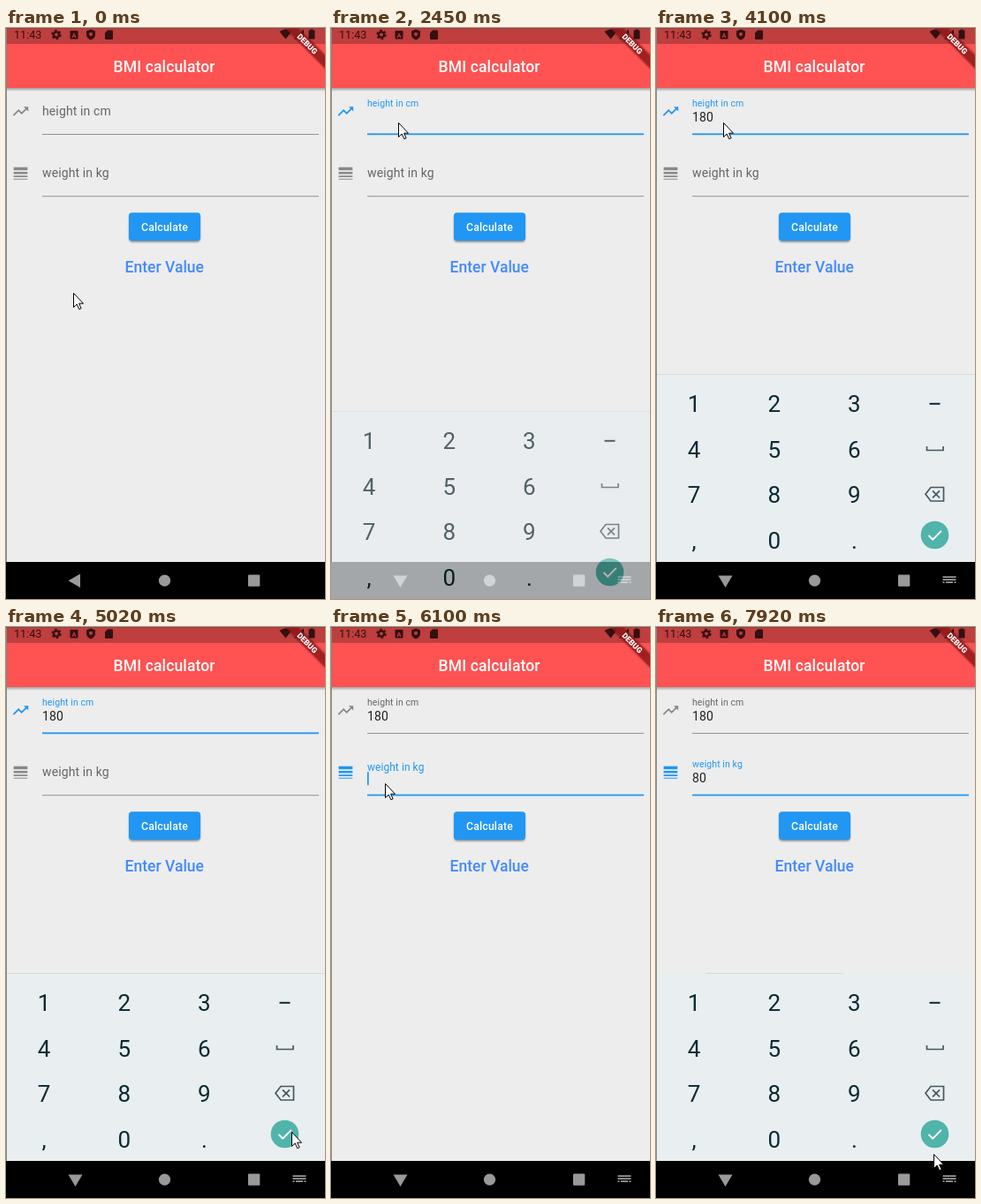
An HTML page that plays this animation: 361x647 px, repeating every 8 s.

```html
<!DOCTYPE html>
<html lang="en">
<head>
<meta charset="utf-8">
<title>BMI calculator</title>
<style>
  html, body { margin: 0; width: 100%; height: 100%; overflow: hidden; background: #ededed; }
  svg { display: block; width: 361px; height: 647px; font-family: Roboto, sans-serif; }
  .field { font-size: 14px; letter-spacing: .12px; }
  .title { font-size: 17.5px; font-weight: 500; }
  .keys text { font-size: 26px; text-anchor: middle; fill: #0b2a32; }
  .stroke { fill: none; stroke: #46585f; stroke-width: 1.7; }
</style>
</head>
<body>
<svg viewBox="0 0 361 647">
  <defs>
    <filter id="soft" x="-20%" y="-50%" width="140%" height="200%"><feGaussianBlur stdDeviation="1.3"/></filter>
    <linearGradient id="drop" x2="0" y2="1">
      <stop stop-opacity=".32"/><stop offset="1" stop-opacity="0"/>
    </linearGradient>
  </defs>
  <rect width="361" height="647" fill="#ededed"/>

  <!-- app bar and status bar -->
  <rect y="68" width="361" height="4" fill="url(#drop)"/>
  <rect width="361" height="68" fill="#ff5252"/>
  <rect width="361" height="18" fill="#bf3e3e"/>
  <text class="title" x="121.5" y="50" fill="#fff" letter-spacing=".13">BMI calculator</text>
  <g fill="#331011">
    <text x="9" y="12.3" font-size="12.6">11:43</text>
    <circle cx="57" cy="7.5" r="3.1" fill="none" stroke="#331011" stroke-width="2.4"/>
    <circle cx="57" cy="7.5" r="4.9" fill="none" stroke="#331011" stroke-width="1.6" stroke-dasharray="2.6 2.53"/>
    <rect x="72.5" y="3" width="9" height="9.5" rx="1"/>
    <path d="M96 1.5l5 2v4q0 4-5 6-5-2-5-6v-4z"/>
    <path d="M115 2.5h5a1 1 0 0 1 1 1v8.500a1 1 0 0 1-1 1h-7a1 1 0 0 1-1-1V5.500z"/>
    <path d="M309.500 4q7-5 14 0l-7 8.500z"/>
    <path d="M337 1.500v11h-11z"/>
    <path d="M342.500 2.500h2v-1h3v1h2v10h-7z"/>
  </g>
  <g fill="#bf3e3e">
    <text x="77" y="10.6" font-size="7.500" font-weight="700" text-anchor="middle">A</text>
    <circle cx="96" cy="7" r="2"/>
  </g>
  <g transform="translate(362 -3) rotate(45)">
    <rect x="-45" y="24.500" width="90" height="10.500" opacity=".5" filter="url(#soft)"/>
    <rect x="-45" y="24.500" width="90" height="10.500" fill="#b71c1c" fill-opacity=".63"/>
    <text y="32.900" font-size="8.900" font-weight="900" text-anchor="middle" fill="#fff">DEBUG</text>
  </g>

  <!-- form -->
  <g id="form"></g>
  <rect x="139.500" y="211" width="80" height="31.500" rx="3.500" opacity=".45" filter="url(#soft)"/>
  <rect x="139" y="209.300" width="81" height="31.700" rx="3.500" fill="#2196f3"/>
  <text x="179.500" y="230" font-size="12.250" font-weight="500" letter-spacing=".18" text-anchor="middle" fill="#fff">Calculate</text>
  <text class="title" x="179.300" y="277.200" text-anchor="middle" fill="#448aff">Enter Value</text>

  <!-- navigation bar -->
  <rect y="605" width="361" height="42"/>
  <g fill="#999">
    <path id="back"/>
    <circle cx="179.500" cy="626.200" r="6.600"/>
    <rect x="274" y="619.500" width="13.300" height="13.300" rx="1"/>
    <path id="imeIcon" d="M324.500 622.200h15M324.500 625.200h15M324.500 628.200h2M328 628.200h8M337.500 628.200h2"
      stroke="#999" stroke-width="1.800"/>
  </g>

  <g id="keyboard" class="keys">
    <rect y="392" width="361" height="213" fill="#e9eef1"/>
    <path id="edge" stroke="#d5dadc"/>
    <g id="digits"></g>
    <path d="M309.500 425.800h12" class="stroke" style="stroke:#0b2a32;stroke-width:2"/>
    <path d="M306.500 474v4.500h18.500v-4.500" class="stroke"/>
    <path d="M311 520.500h14.500v15.500h-14.500l-6-7.750z" class="stroke"/>
    <path d="M313 524.300l8 8m0-8l-8 8" class="stroke"/>
    <circle cx="315.500" cy="574.500" r="15.800" fill="#50b4aa"/>
    <path d="M308.500 575l4.700 4.700 9.600-9.800" class="stroke" style="stroke:#fff;stroke-width:2"/>
  </g>

  <path id="pointer" d="M.5.500v16l3.700-3.500 2.600 5.700 2.300-1-2.500-5.500h4.900z" fill="#fff" stroke="#000"/>
  <path d="M.5 0v605" stroke="#7f8b8b"/>
  <path d="M0 .5h361" stroke="#6e4a4a" opacity=".6"/>
</svg>
<script>
const $ = id => document.getElementById(id);
const BLUE = '#2196f3';

// Value of the last [time, value...] row reached; empty before the first one.
const held = (rows, t) => rows.findLast(r => r[0] <= t)?.slice(1) ?? [];
const within = (t, ...spans) => spans.some(([a, b]) => t >= a && t < b);

const TREND = 'M16 6l2.290 2.290-4.880 4.880-4-4L2 16.590 3.410 18l6-6 4 4 6.300-6.290L22 12V6z';
const LINES = 'M3 17h18v-2H3zM3 20h18v-1H3zM3 13h18v-3H3zM3 4v4h18V4z';

const fields = [
  { label: 'height in cm', icon: TREND, y: 0, focus: [1930, 5160], labelEnd: 5310,
    float: [[1930, .45], [2050, .88], [2170, 1]],
    typed: [[2720, '1'], [3420, '18'], [3540, '180']],
    caret: [[1930, 2170], [2720, 4100], [4640, 5020]] },
  { label: 'weight in kg', icon: LINES, y: 70.200, focus: [6100, 8000], labelEnd: 8000,
    float: [[6100, .6], [6220, 1]],
    typed: [[6860, '8'], [7110, '80']],
    caret: [[6100, 6460], [6860, 7510]] }
];

// time, downward shift, opacity
const keyboardRows = [
  [0, 0, 0], [2450, 42, .7], [2570, .8, 1], [2720, 0, 1], [5160, 22, .6], [5310, 0, 0],
  [6220, 40, .7], [6340, 0, 1]
];

// time, x, y
const pointerRows = [
  [0, 76, 300], [840, 73, 230], [970, 76, 140], [1120, 76, 107],
  [4220, 76, 112], [4370, 200, 300], [4490, 329, 475], [4640, 336, 550], [4760, 323, 572],
  [5160, 322, 569], [5460, 200, 380], [5580, 68, 192], [5730, 61, 177],
  [7510, 120, 330], [7630, 201, 522], [7770, 303, 601], [7920, 314, 597]
];

$('form').innerHTML = fields.map(f => `<g transform="translate(0 ${f.y})">
  <path d="${f.icon}" transform="translate(6 84) scale(.875)"/>
  <rect x="41" width="313"/>
  <text class="field">${f.label}</text>
  <text class="field" x="41" y="106.300" fill="#222"></text>
  <rect y="94" width="1.750" height="15" fill="${BLUE}"/></g>`).join('');
fields.forEach((f, i) => f.parts = [...$('form').children[i].children]);

$('digits').innerHTML = [...'123456789,0.'].map((c, i) =>
  `<text x="${43 + i % 3 * 90.700}" y="${435 + Math.floor(i / 3) * 51.500}">${c}</text>`).join('');

function set(el, attrs) {
  for (const k in attrs) el.setAttribute(k, attrs[k]);
}

function drawField(f, t) {
  const [icon, line, label, value, caret] = f.parts;
  const focused = within(t, f.focus);
  const [up = 0] = held(f.float, t);
  const [text = ''] = held(f.typed, t);
  set(icon, { fill: focused ? BLUE : '#898989' });
  set(line, focused ? { y: 119.400, height: 1.800, fill: BLUE } : { y: 120, height: 1, fill: '#929292' });
  set(label, {
    transform: `translate(41 ${99 - 10.400 * up}) scale(${1 - .25 * up})`,
    fill: within(t, [f.focus[0], f.labelEnd]) ? BLUE : '#666'
  });
  value.textContent = text;
  set(caret, { x: 41 + 8 * text.length, opacity: +within(t, ...f.caret) });
}

function draw(t) {
  fields.forEach(f => drawField(f, t));
  const open = within(t, [1810, 5160], [5980, 8000]);
  set($('back'), { d: open ? 'M70.500 620.500h16l-8 13.500z' : 'M70.500 626.200l13.500-7.700v15.400z' });
  set($('imeIcon'), { opacity: +open });

  const [shift, alpha] = held(keyboardRows, t);
  set($('keyboard'), { transform: `translate(0 ${shift})`, opacity: alpha });
  set($('edge'), { d: t < 5310 ? 'M0 392.500h361' : t < 7510 ? '' : 'M56 392.500h156' });

  set($('pointer'), { transform: `translate(${held(pointerRows, t)})` });
}

function tick(now) {
  draw(now % 8000);
  requestAnimationFrame(tick);
}
draw(0);
requestAnimationFrame(tick);
</script>
</body>
</html>
```
